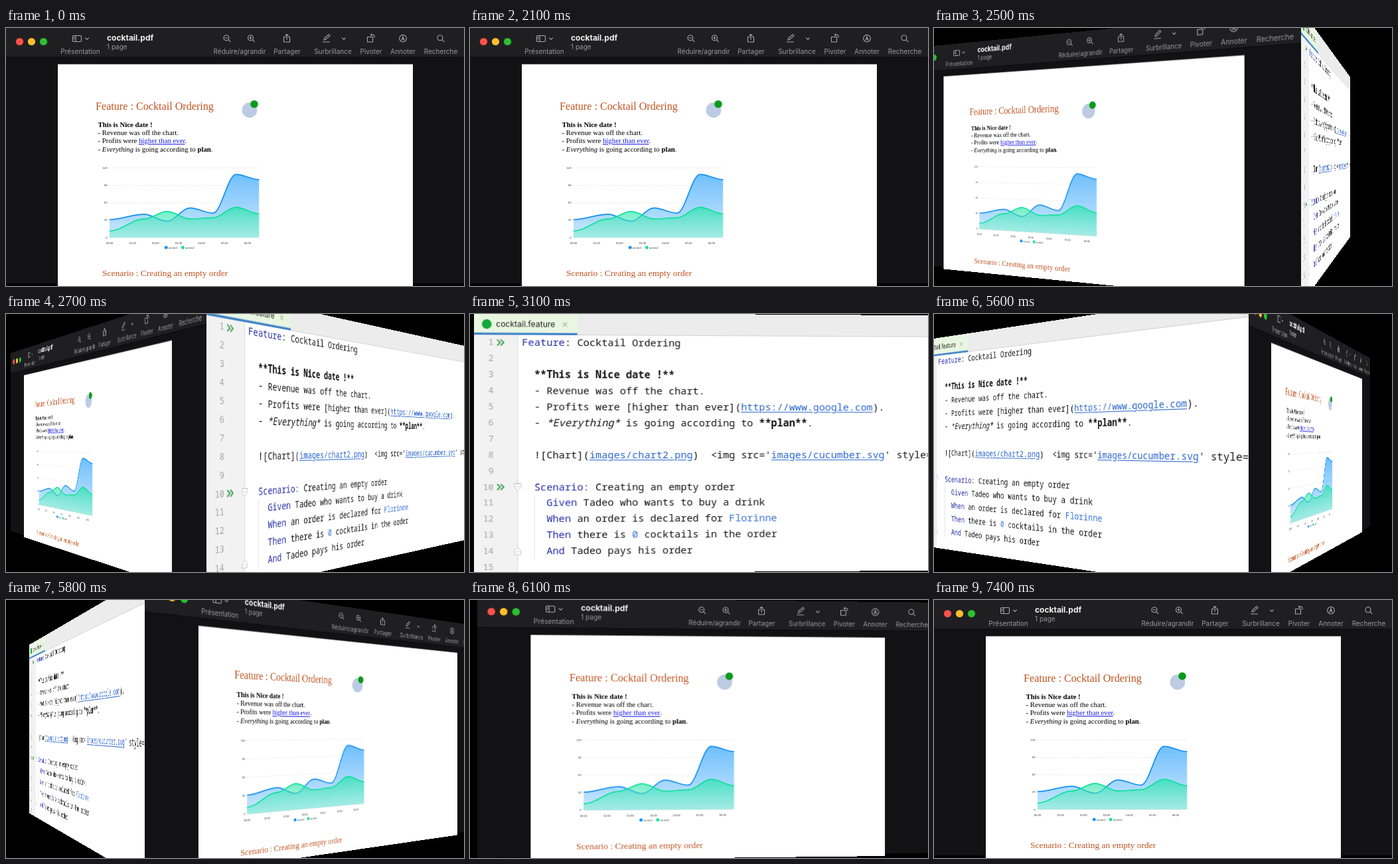
An HTML page for the animation above (8200 ms loop, 690 by 388 pixels).

```html
<!DOCTYPE html>
<html lang="en">
<head>
<meta charset="utf-8">
<title>Feature preview</title>
<style>
html, body { margin: 0; width: 100%; height: 100%; overflow: hidden; background: #000; }
#stage { position: relative; width: 690px; height: 388px; overflow: hidden; perspective: 870px; }
.face { position: absolute; inset: 0; overflow: hidden; backface-visibility: hidden; }
svg { position: absolute; left: 0; top: 0; }
#pdf { background: #121215; }
.ui { font: 10px Inter, Roboto, sans-serif; fill: #98989b; text-anchor: middle; }
.icon { fill: none; stroke: #a9a9ac; stroke-width: 1.1; stroke-linecap: round; stroke-linejoin: round; }
.doc { font: 10.8px "Liberation Serif", serif; fill: #000; }
.head { fill: #bf5320; }
.tiny { font: 4.2px "Liberation Sans", sans-serif; fill: #333; }
#code { background: #fff; }
pre { position: absolute; top: 32.4px; margin: 0; font: 15.2px/23.9px "Noto Sans Mono", "DejaVu Sans Mono", monospace; color: #121212; }
#nums { left: 0; width: 29px; text-align: right; font-size: 13.2px; color: #a3a3a3; }
#text { left: 70.7px; }
#text b { font-weight: 700; }
u { color: #2763cc; text-underline-offset: 2px; }
k { color: #2328a6; }
v { color: #3570d8; }
.tab { font: 12px Inter, Roboto, sans-serif; fill: #222; }
</style>
</head>
<body>
<div id="stage">
  <div class="face" id="pdf">
    <svg width="690" height="388">
      <defs>
        <linearGradient id="blue" x2="0" y2="1">
          <stop stop-color="#36a6fc" stop-opacity=".72"/><stop offset="1" stop-color="#80c7fd" stop-opacity=".45"/>
        </linearGradient>
        <linearGradient id="green" x2="0" y2="1">
          <stop stop-color="#1fe3a8" stop-opacity=".68"/><stop offset="1" stop-color="#80f1cb" stop-opacity=".5"/>
        </linearGradient>
      </defs>
      <rect width="690" height="44" fill="#1f1f21"/>
      <rect y="43.5" width="690" height="1" fill="#08080a"/>
      <rect y="384" width="690" height="4" fill="#000"/>
      <circle cx="20.5" cy="20.5" r="5.6" fill="#fe5049"/>
      <circle cx="38.5" cy="20.5" r="5.6" fill="#fdbd2e"/>
      <circle cx="56.5" cy="20.5" r="5.6" fill="#28c231"/>
      <g class="ui">
        <text x="152" y="18.5" style="font-weight:700;font-size:12px;fill:#f2f2f2;text-anchor:start">cocktail.pdf</text>
        <text x="152" y="31.5" style="text-anchor:start">1 page</text>
        <text x="112" y="38.5">Présentation</text>
        <text x="352" y="38.5">Réduire/agrandir</text>
        <text x="423.5" y="38.5">Partager</text>
        <text x="492.5" y="38.5">Surbrillance</text>
        <text x="550" y="38.5">Pivoter</text>
        <text x="598" y="38.5">Annoter</text>
        <text x="655" y="38.5">Recherche</text>
      </g>
      <g class="icon">
        <rect x="100.5" y="11.5" width="13" height="9" rx="1.5"/>
        <path d="M105 11.5v9M102 14h1.4M102 16h1.4M119.5 14.8l2.5 2.6 2.5-2.6M506.5 14.8l2.5 2.6 2.5-2.6"/>
        <g id="lens"><circle cx="332" cy="14.7" r="4"/><path d="M335 17.7l3 3"/></g>
        <use href="#lens" x="36.5"/><use href="#lens" x="322"/>
        <path d="M330.2 14.7h3.6M366.7 14.7h3.6M368.5 12.9v3.6"/>
        <path d="M421 13.5h-2.5v7.5h9v-7.5h-2.5M423 17.5V9.5M420.8 11.5l2.2-2.2 2.2 2.2"/>
        <path d="M479 18l1-3 6.3-5.3 1.8 1.9-6.2 5.6zM477.5 21h10"/>
        <path d="M544.5 13.5h8v7.5h-8zM549.5 10.3h3.5q2 0 2 2.2v1.5M551 8.8l-1.7 1.5 1.7 1.5"/>
        <circle cx="598" cy="15.7" r="5.3"/><path d="M596 18.6l2-6 2 6M596.8 16.8h2.4"/>
      </g>
      <rect x="78" y="54.5" width="535" height="334" fill="#fff"/>
      <g class="doc">
        <text class="head" x="135" y="123" font-size="16.15" style="font-size:16.15px">Feature : Cocktail Ordering</text>
        <text x="138.5" y="148.7" font-weight="bold" style="font-weight:bold">This is Nice date !</text>
        <text x="138.5" y="161">- Revenue was off the chart.</text>
        <text x="138.5" y="173.3">- Profits were <tspan fill="#1a1ae6" text-decoration="underline">higher than ever</tspan>.</text>
        <text x="138.5" y="185.8">- <tspan font-style="italic">Everything</tspan> is going according to <tspan font-weight="bold">plan</tspan>.</text>
        <text class="head" x="145" y="373.3" style="font-size:13.5px">Scenario : Creating an empty order</text>
      </g>
      <circle cx="367" cy="123.5" r="11.4" fill="#bccbe2"/>
      <circle cx="374" cy="114.5" r="5.8" fill="#0a9a1c"/>
      <g id="chart" class="tiny"></g>
    </svg>
  </div>
  <div class="face" id="code">
    <svg width="690" height="388">
      <rect width="690" height="32.5" fill="#ececec"/>
      <rect y="32" width="690" height="1" fill="#d2d2d2"/>
      <rect width="153" height="32" fill="#e9f6e1"/>
      <rect y="29.7" width="153" height="3.2" fill="#4083c9"/>
      <circle cx="18.7" cy="17" r="7.2" fill="#16a83c"/>
      <text class="tab" x="32.3" y="21.3">cocktail.feature</text>
      <path d="M131.5 14l6.4 6.4m0-6.4l-6.4 6.4" stroke="#a9b3a5" stroke-width="1.1"/>
      <rect y="33" width="64.5" height="355" fill="#f2f2f2"/>
      <path d="M64.5 33v355" stroke="#d9d9d9"/>
      <path d="M89.5 272v95" stroke="#e2e2e2"/>
      <g id="run" fill="none" stroke="#45a355" stroke-width="2">
        <path d="M34 39.9l4.6 4.5-4.6 4.5M39.2 39.9l4.6 4.5-4.6 4.5"/>
      </g>
      <use href="#run" y="215.1"/>
      <g fill="#fff" stroke="#c4c4c4">
        <path d="M59.8 254.5h9.4v6l-4.7 4.3-4.7-4.3zM62 259h5"/>
        <path d="M59.8 360.3h9.4v-6l-4.7-4.3-4.7 4.3zM62 356h5"/>
      </g>
    </svg>
    <pre id="nums"></pre>
    <pre id="text"><k>Feature</k>: Cocktail Ordering

  <b>**This is Nice date !**</b>
  - Revenue was off the chart.
  - Profits were [higher than ever](<u>https://www.google.com</u>).
  - <i>*Everything*</i> is going according to <b>**plan**</b>.

  ![Chart](<u>images/chart2.png</u>)  &lt;img src='<u>images/cucumber.svg</u>' style=

  <k>Scenario:</k> Creating an empty order
    <k>Given</k> Tadeo who wants to buy a drink
    <k>When</k> an order is declared for <v>Florinne</v>
    <k>Then</k> there is <v>0</v> cocktails in the order
    <k>And</k> Tadeo pays his order
</pre>
  </div>
</div>
<script>
const $ = id => document.getElementById(id);

$('nums').textContent = Array.from({length: 15}, (_, i) => i + 1).join('\n');

// Area chart: hours across, values upwards
const hours = [0, 1.5, 2.5, 3.5, 4.5, 5.5, 6.5];
const px = h => 156 + 34.65 * h, py = v => 315 - 0.871 * v;

function curve(values) {
  let d = `M${px(0)} ${py(values[0])}`;
  for (let i = 1; i < values.length; i++) {
    const a = px(hours[i - 1]), b = px(hours[i]), bend = (b - a) * 0.35;
    d += `C${a + bend} ${py(values[i - 1])} ${b - bend} ${py(values[i])} ${b} ${py(values[i])}`;
  }
  return d;
}

function area(values, fill, stroke) {
  const d = curve(values);
  return `<path d="${d}V315H156z" fill="url(#${fill})"/>
    <path d="${d}" fill="none" stroke="${stroke}" stroke-width="1.7"/>`;
}

function label(x, y, text, anchor) {
  return `<text x="${x}" y="${y}" text-anchor="${anchor}">${text}</text>`;
}

let chart = '';
for (let v = 0; v <= 120; v += 30) {
  chart += `<path d="M156 ${py(v)}H381" stroke="#dedede" stroke-width=".7" stroke-dasharray="${v ? 2 : 0}"/>`;
  chart += label(152.5, py(v) + 1.5, v, 'end');
}
for (let h = 0; h < 7; h++) chart += label(px(h), 325, `0${h}:00`, 'middle');
chart += area([31, 40, 28, 51, 42, 109, 100], 'blue', '#1290f4');
chart += area([11, 32, 45, 32, 34, 52, 41], 'green', '#0ee09a');
[['#008ffb', 241.3], ['#00e396', 266.3]].forEach(([color, x], i) => {
  chart += `<circle cx="${x}" cy="330.2" r="2.4" fill="${color}"/>` + label(x + 3.7, 331.8, `series${i + 1}`, 'start');
});
$('chart').innerHTML = chart;

// Cube turn between the two faces
const LOOP = 8200, TURN = 1040, HALF = 345;

function turn(t, start) {
  const p = Math.min(1, Math.max(0, (t - start) / TURN));
  return 45 * (1 - Math.cos(Math.PI * p));
}

function place(face, angle) {
  face.style.visibility = Math.abs(angle) >= 89.99 ? 'hidden' : 'visible';
  face.style.transform = angle
    ? `translateZ(${-HALF}px) rotateY(${angle}deg) translateZ(${HALF}px)` : 'none';
}

const pdf = $('pdf'), code = $('code');

function draw() {
  const t = performance.now() % LOOP;
  const toCode = t < 4200;
  const a = turn(t, toCode ? 2150 : 5178);
  place(toCode ? pdf : code, -a);
  place(toCode ? code : pdf, 90 - a);
  requestAnimationFrame(draw);
}
draw();
</script>
</body>
</html>
```
